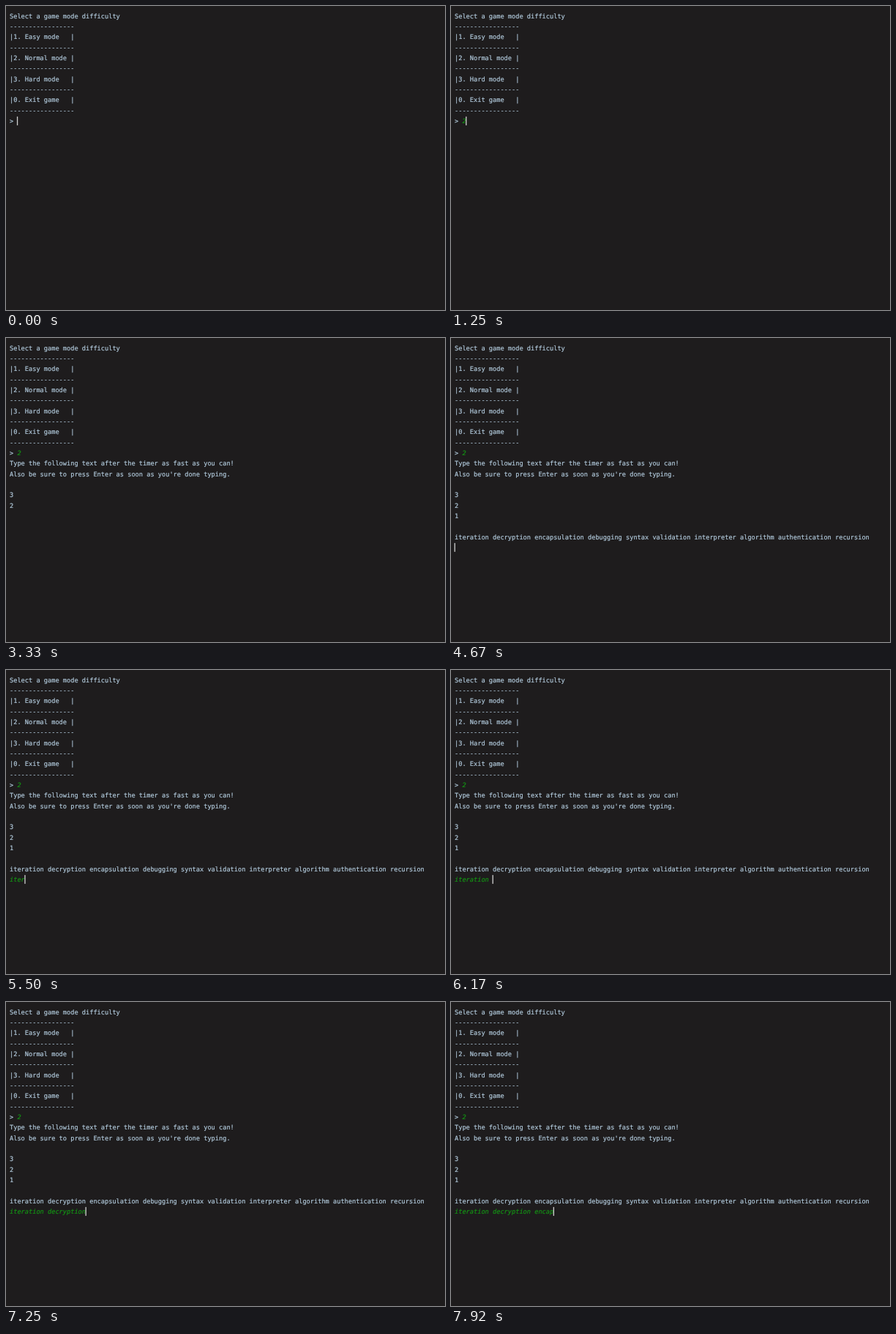
Recreate the animation shown at these times as an HTML page with a canvas. Size 600 by 415 pixels, loop 8 s.

```html
<!DOCTYPE html>
<html lang="en">
<head>
<meta charset="utf-8">
<title>Typing game</title>
<style>
  html, body { margin: 0; width: 100%; height: 100%; overflow: hidden; background: #1e1c1d; }
  canvas { display: block; }
</style>
</head>
<body>
<canvas id="stage" width="600" height="415"></canvas>
<script>
const ctx = document.getElementById('stage').getContext('2d');
const LOOP = 8000, LEFT = 5, CELL = 5.2, LEADING = 14.33, BASELINE = 16.6;
const COLORS = { back: '#1e1c1d', output: '#b0c8da', input: '#149214', caret: '#d0d0d0' };
const FONT = '8.64px "DejaVu Sans Mono", "Noto Sans Mono", monospace';

// Key moments in ms
const CHOOSE = 1170, ENTER = 1500, COUNTDOWN = 1670, SECOND = 1000;
const TYPING = 5250, TYPED = 7900, BLINK = 500, SHOWN = 660;

const rule = '-'.repeat(17);
const choices = ['|1. Easy mode   |', '|2. Normal mode |', '|3. Hard mode   |', '|0. Exit game   |'];
const menu = ['Select a game mode difficulty', rule, ...choices.flatMap(choice => [choice, rule]), '>'];
const intro = [
  'Type the following text after the timer as fast as you can!',
  "Also be sure to press Enter as soon as you're done typing.",
  ''
];
const phrase = 'iteration decryption encapsulation debugging syntax validation interpreter algorithm authentication recursion';
const answer = phrase.slice(0, 26);
const promptRow = menu.length - 1;

function drawText(text, row, col, color, style = '') {
  const y = Math.round(BASELINE + row * LEADING);
  ctx.font = style + FONT;
  ctx.fillStyle = ctx.strokeStyle = color;
  ctx.lineWidth = 0.2;
  [...text].forEach((char, i) => {
    const x = LEFT + (col + i) * CELL;
    ctx.fillText(char, x, y);
    ctx.strokeText(char, x, y);
  });
}

function drawCaret(row, col) {
  ctx.fillStyle = COLORS.caret;
  ctx.fillRect(LEFT - 0.5 + col * CELL, 7.6 + row * LEADING, 1.3, 12);
}

// The typist starts briskly and slows a little
function typedCount(time) {
  if (time < TYPING) return 0;
  const progress = Math.min(1, (time - TYPING) / (TYPED - TYPING));
  return 1 + Math.floor((answer.length - 1) * progress ** 0.89);
}

function drawPrompt(time) {
  const chosen = time >= CHOOSE;
  if (chosen) drawText('2', promptRow, 2, COLORS.input, 'italic ');
  if (time >= ENTER) drawCaret(promptRow + 1, 0);
  else if (chosen) drawCaret(promptRow, 3);
  else if (Math.floor((time + 170) / BLINK) % 2 === 0) drawCaret(promptRow, 2);
}

function drawGame(time) {
  const elapsed = time - COUNTDOWN;
  const ticks = Math.min(3, Math.floor(elapsed / SECOND));
  const lines = [...intro, ...['3', '2', '1'].slice(0, ticks + 1)];
  if (ticks === 3) lines.push('', phrase);
  lines.forEach((line, i) => drawText(line, promptRow + 1 + i, 0, COLORS.output));

  const row = promptRow + 1 + lines.length;
  const typed = typedCount(time);
  drawText('2', promptRow, 2, COLORS.input, 'italic ');
  drawText(answer.slice(0, typed), row, 0, COLORS.input, 'italic ');
  if (typed || elapsed % SECOND < SHOWN) drawCaret(row, typed);
}

function draw(time) {
  ctx.fillStyle = COLORS.back;
  ctx.fillRect(0, 0, 600, 415);
  menu.forEach((line, row) => drawText(line, row, 0, COLORS.output));
  if (time < COUNTDOWN) drawPrompt(time);
  else drawGame(time);
}

function tick() {
  draw(performance.now() % LOOP);
  requestAnimationFrame(tick);
}

ctx.textRendering = 'geometricPrecision';
tick();
</script>
</body>
</html>
```
